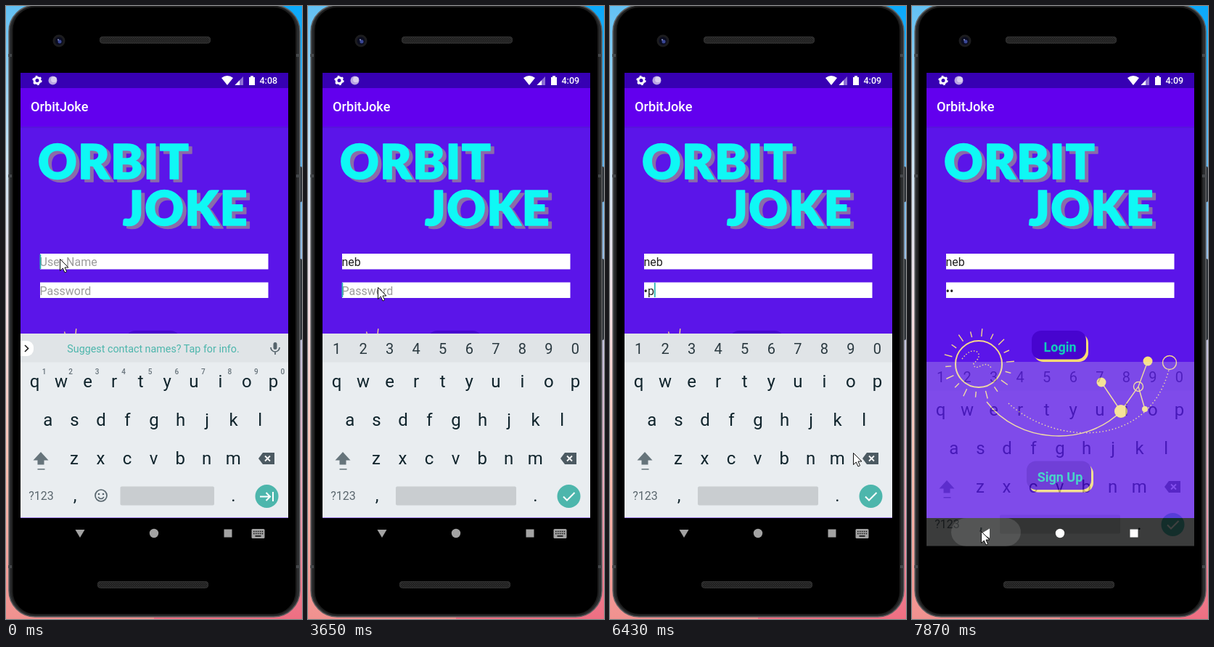
These frames come from a looping animation (408x844 px, 7.99 s). An HTML page:

```html
<!DOCTYPE html>
<html lang="en">
<head>
<meta charset="utf-8">
<title>Login screen</title>
<style>
html, body { margin: 0; width: 100%; height: 100%; overflow: hidden; background: #000; }
svg { display: block; width: 100vw; height: 100vh; }
text { font-family: Roboto, sans-serif; white-space: pre; }
.mid { text-anchor: middle; }
.key { font-size: 24px; fill: #10242c; }
.num { font-size: 20px; fill: #2b3a41; }
.sup { font-size: 10px; fill: #66727a; font-weight: 500; }
.field { font-size: 16px; }
.logo { font: 900 66px Lato, sans-serif; letter-spacing: 1.5px; stroke-width: 1.5; stroke-linejoin: round; }
.button { font-size: 18px; font-weight: 700; fill: #12cdbb; }
.line { fill: none; stroke: #f5d78c; stroke-width: 1.4; }
.icon { fill: none; stroke: #56646c; stroke-width: 1.7; }
</style>
</head>
<body>
<svg id="stage" viewBox="0 0 408 844" preserveAspectRatio="none"></svg>
<script>
const LOOP = 7990;
const stage = document.getElementById('stage');

const rect = (x, y, w, h, fill, r = 0, more = '') =>
  `<rect x="${x}" y="${y}" width="${w}" height="${h}" rx="${r}" fill="${fill}" ${more}/>`;
const circle = (x, y, r, attrs) => `<circle cx="${x}" cy="${y}" r="${r}" ${attrs}/>`;
const path = (d, attrs) => `<path d="${d}" ${attrs}/>`;
const label = (x, y, text, cls, more = '') =>
  `<text x="${x}" y="${y}" class="${cls}" ${more}>${text}</text>`;
const gradient = (id, colors) => `<linearGradient id="${id}" x2="0" y2="1">` +
  colors.map((c, i) => `<stop offset="${i / (colors.length - 1)}" stop-color="${c}"/>`).join('') +
  '</linearGradient>';

function speaker(x, y) {
  return rect(x, y, 153, 9.5, '#1d1d1d', 4) + rect(x, y, 153, 9.5, 'url(#mesh)', 4) +
    rect(x + .5, y + .5, 152, 8.5, 'none', 4, 'stroke="#343434"');
}

function phone() {
  return rect(0, 0, 204, 844, 'url(#leftSky)') + rect(204, 0, 204, 844, 'url(#rightSky)') +
    rect(403, 221, 5, 49, '#30343a', 2) + rect(403, 348, 5, 112, '#30343a', 2) +
    rect(4, -1, 401, 842, '#2b2d2f', 36, 'stroke="#5d5f61" stroke-width="1.500"') +
    rect(8.5, 1, 391.5, 837, '#000', 32, 'stroke="#1c1c1c" stroke-width="2"') +
    [66, 232, 770].map(y => rect(3, y, 5, 4, '#45484b') + rect(400, y, 5, 4, '#45484b')).join('') +
    circle(73, 48, 8.5, 'fill="#1c1c1e"') + circle(73, 48, 5.5, 'fill="#0b0d20"') +
    circle(74, 49, 2.5, 'fill="#3a4796"') + circle(72, 46.5, 1, 'fill="#9aa5d8"') +
    speaker(129, 42) + speaker(126, 792);
}

function statusBar() {
  return rect(20, 92, 369, 21, '#3700b3') +
    circle(43, 102.5, 4, 'fill="none" stroke="#fff" stroke-width="3"') +
    circle(43, 102.5, 5.7, 'fill="none" stroke="#fff" stroke-width="2" stroke-dasharray="2.6 3.37"') +
    circle(64.5, 102.5, 6, 'fill="#b9a5e2"') +
    circle(66, 101.2, 4, 'fill="#d9cef0"') +
    path('M297 99q8-6 16 0l-8 10z', 'fill="#fff"') +
    path('M315.500 109h11.500V97z', 'fill="#8d6fd4"') + path('M315.500 109h6.500v-6.800z', 'fill="#fff"') +
    path('M335 98h2v-1.800h4V98h2v11h-8z', 'fill="#fff"') +
    label(349.5, 107, '', '', 'id="clock" font-size="12.500" font-weight="500" fill="#fff"');
}

function logo() {
  const words = color => `<g fill="${color}" stroke="${color}">` +
    label(44, 238, 'ORBIT', 'logo') + label(161, 302, 'JOKE', 'logo') + '</g>';
  return `<g transform="translate(5 4)">${words('#8a6ca9')}</g>` + words('#0ff8f5');
}

function button(x, y, w, text) {
  return rect(x + 3, y + 4, w, 39, '#f9db74', 13) + rect(x, y, w, 39.5, '#4704cf', 13) +
    label(204, y + 28.5, text, 'button mid');
}

function artwork() {
  let rays = '';
  for (let i = 0; i < 18; i++) {
    const a = (i + .78) / 18 * 2 * Math.PI, c = Math.cos(a), s = Math.sin(a);
    const far = i % 2 ? 49 : 46;
    rays += `M${92 + 38 * c} ${493 + 38 * s}L${92 + far * c} ${493 + far * s}`;
  }
  const yellow = 'fill="#fbe07c"', ring = 'class="line"';
  return path(rays, ring) + circle(92, 493, 32, 'class="line" style="stroke-width:2"') +
    path('M69 486q12-16 22-9q4 7-6 15q0 9 11 3q8-4 13 3', 'class="line" stroke-dasharray="1.500 2.500"') +
    path('M103 545C145 601 237 609 288 558L261 518M288 558L312 524L325 489M312 524L321 555', ring) +
    path('M133 547C198 606 326 609 354 501', 'class="line" stroke-dasharray="1.500 3"') +
    circle(261, 518, 6.5, yellow) + circle(288, 558, 9, yellow) + circle(321, 555, 4, yellow) +
    circle(325, 489, 6.5, yellow) + circle(312, 524, 6.5, ring) + circle(355, 491, 9.5, ring);
}

function app() {
  return rect(20, 113, 369, 592, '#5b15e9') + rect(20, 113, 369, 53, '#6200ee') +
    rect(20, 166, 369, 2, '#000', 0, 'opacity=".06"') +
    label(34, 145, 'OrbitJoke', '', 'font-size="18.200" font-weight="500" fill="#fff"') + logo() +
    rect(47, 341, 314.5, 21.5, '#fff') + rect(47, 380.5, 314.5, 21.5, '#fff') +
    label(46.5, 358, '', 'field', 'id="user"') + label(46.5, 397.5, '', 'field', 'id="pass"') +
    '<rect id="caret" width="1.800" height="20" fill="#2cb5b5"/>' +
    artwork() + button(165, 447, 75, 'Login') + button(158, 626.5, 89, 'Sign Up');
}

function keyRow(keys, x, y, cls) {
  return [...keys].map((k, i) => label(x + 36.55 * i, y, k, cls + ' mid')).join('');
}

function keyboard() {
  const suggest = rect(20, 461, 18, 21, '#fff', 9) + rect(20, 461, 9, 21, '#fff') +
    path('M26 467l4.500 4.500l-4.500 4.500', 'class="icon" style="stroke:#222"') +
    label(203, 477, 'Suggest contact names? Tap for info.', 'mid', 'id="tip" font-size="14.300" fill="#4db6ac"') +
    rect(368.5, 463, 5, 10, '#56646c', 2.5) + path('M365 470a6 6 0 0 0 12 0M371 476v4', 'class="icon"');
  const plain = suggest + keyRow('1234567890', 52.5, 507, 'sup') +
    circle(131, 674, 8, 'class="icon"') + path('M127 676q4 5 8 0', 'class="icon"') +
    circle(128, 672, 1.3, 'fill="#56646c"') + circle(134, 672, 1.3, 'fill="#56646c"') +
    rect(157.5, 661.5, 129.5, 26, '#c9cdd0', 2) +
    path('M350 675.500h13M358.500 670l5.500 5.500l-5.500 5.500M368 669v13', 'fill="none" stroke="#fff" stroke-width="2"');
  const secret = keyRow('1234567890', 39.5, 479, 'num') + rect(121, 661.5, 166, 26, '#c9cdd0', 2) +
    path('M352 675.500l5 5l10.500-10.500', 'fill="none" stroke="#fff" stroke-width="2"');
  return rect(20, 451, 369, 40, '#e0e4e7') + rect(20, 490.5, 369, 214, '#e9edf0') +
    keyRow('qwertyuiop', 39.5, 525, 'key') + keyRow('asdfghjkl', 57.8, 578, 'key') +
    keyRow('zxcvbnm', 94, 631, 'key') +
    path('M48 614l10.500 11.500h-6v6h-9v-6h-6z', 'fill="#66747b"') + rect(43.5, 637, 10, 1.5, '#66747b') +
    path('M348 623l6-8h16v16h-16z', 'fill="#4c5a62"') +
    path('M357 619.500l7 7m0-7l-7 7', 'stroke="#fff" stroke-width="1.800"') +
    label(48.5, 680, '?123', 'mid', 'font-size="16" fill="#5b676e"') +
    label(95, 682, ',', 'key mid') + label(313.5, 682, '.', 'key mid') +
    circle(359.5, 675, 16, 'fill="#4db6ac"') +
    `<g id="plainKeys">${plain}</g><g id="secretKeys">${secret}</g>`;
}

function navBar() {
  return '<rect id="ripple" y="705" fill="#fff" fill-opacity=".125"/>' +
    '<g id="nav">' + path('M95.500 721h13l-6.500 11z', 'id="back"') + circle(204, 726, 6.2, '') +
    rect(300.5, 720.5, 11, 11, 'inherit') + '</g>' +
    `<g id="switcher">${rect(338.5, 720, 18, 13, '#a3a3a3', 1.5)}` +
    path('M341 723.500h13.500M341 726.500h13.500', 'stroke="#111" stroke-width="1.600" stroke-dasharray="1.600 1.300"') +
    rect(343.5, 729, 8, 1.6, '#111') + '</g>';
}

stage.innerHTML = '<defs>' +
  gradient('leftSky', ['#62c0f3', '#cde5f5', '#f4dfe3', '#f8c0b2', '#f0918f']) +
  gradient('rightSky', ['#0aa9fb', '#62b4ec', '#b9c6e4', '#eab2c4', '#ee6f82']) +
  '<pattern id="mesh" width="3" height="3" patternUnits="userSpaceOnUse"><path d="M0 0l3 3M3 0l-3 3" stroke="#303030" stroke-width=".7"/></pattern>' +
  '<clipPath id="screen"><rect x="20" y="92" width="369" height="652"/></clipPath></defs>' +
  phone() + `<g clip-path="url(#screen)">${rect(20, 705, 369, 39, '#000')}${app()}${statusBar()}` +
  `<g id="keyboard">${keyboard()}</g></g>` + navBar() +
  path('M.5 .5V16.500L4.300 13L7 19L9.600 17.800L7 12H12z', 'id="mouse" fill="#fff" stroke="#111"');

const el = Object.fromEntries([...stage.querySelectorAll('[id]')].map(e => [e.id, e]));

// Each track lists [start time, value...]; values hold until the next entry.
const at = (track, t) => track.findLast(step => step[0] <= t);
const mouseTrack = [
  [0, 74, 348], [3150, 82, 361], [3290, 96, 387], [6070, 120, 410], [6190, 200, 480],
  [6310, 285, 560], [6430, 335, 615], [6550, 353, 634], [6700, 353, 644], [6850, 358, 656],
  [6970, 336, 675], [7090, 301, 693], [7210, 255, 708], [7370, 190, 721], [7490, 130, 726],
  [7610, 95, 723]
];
const userTrack = [[0, ''], [1130, 'n'], [2140, 'ne'], [3150, 'neb']];
const passTrack = [[0, ''], [5040, 'o'], [5290, '•p'], [6700, '••']];
const caretTrack = [
  [0, 1], [510, 0], [1010, 1], [1640, 0], [2140, 1], [2640, 0], [3150, 1], [4160, 0],
  [4660, 1], [5820, 0], [6310, 1], [6850, 0], [7370, 1], [7730, 0]
];
const rippleTrack = [[0, 0], [7610, 44], [7730, 70], [7870, 96]];

const show = (node, on) => node.setAttribute('visibility', on ? 'visible' : 'hidden');

function fill(node, text, hint) {
  node.textContent = text || hint;
  node.setAttribute('fill', text ? '#222' : '#9b9b9b');
  return 46.5 + (text ? node.getComputedTextLength() : 0);
}

function draw(t) {
  const secret = t >= 3530, closing = t >= 7870, pressed = t >= 7610;
  const [, x, y] = at(mouseTrack, t);
  el.mouse.setAttribute('transform', `translate(${x} ${y})`);
  el.clock.textContent = t < 1010 ? '4:08' : '4:09';

  const userEnd = fill(el.user, at(userTrack, t)[1], 'User Name');
  const passEnd = fill(el.pass, at(passTrack, t)[1], 'Password');
  el.user.setAttribute('text-decoration', t >= 1130 && !secret ? 'underline' : 'none');
  el.caret.setAttribute('x', secret ? passEnd : userEnd);
  el.caret.setAttribute('y', secret ? 381 : 342);
  show(el.caret, at(caretTrack, t)[1]);

  show(el.plainKeys, !secret);
  show(el.secretKeys, secret);
  show(el.tip, t < 3150 ? true : false);
  if (secret) show(el.tip, false);
  el.keyboard.setAttribute('transform', `translate(0 ${closing ? 39 : 0})`);
  el.keyboard.setAttribute('opacity', closing ? .25 : 1);

  const width = at(rippleTrack, t)[1];
  el.ripple.setAttribute('x', 102 - width / 2);
  el.ripple.setAttribute('width', width);
  el.ripple.setAttribute('height', closing ? 39 : 43);
  el.ripple.setAttribute('rx', 21);
  el.back.setAttribute('transform', pressed ? 'rotate(90 102 726)' : '');
  el.nav.setAttribute('fill', closing ? '#fff' : '#a3a3a3');
  show(el.switcher, !pressed);
}

function tick() {
  draw(performance.now() % LOOP);
  requestAnimationFrame(tick);
}
tick();
</script>
</body>
</html>
```
